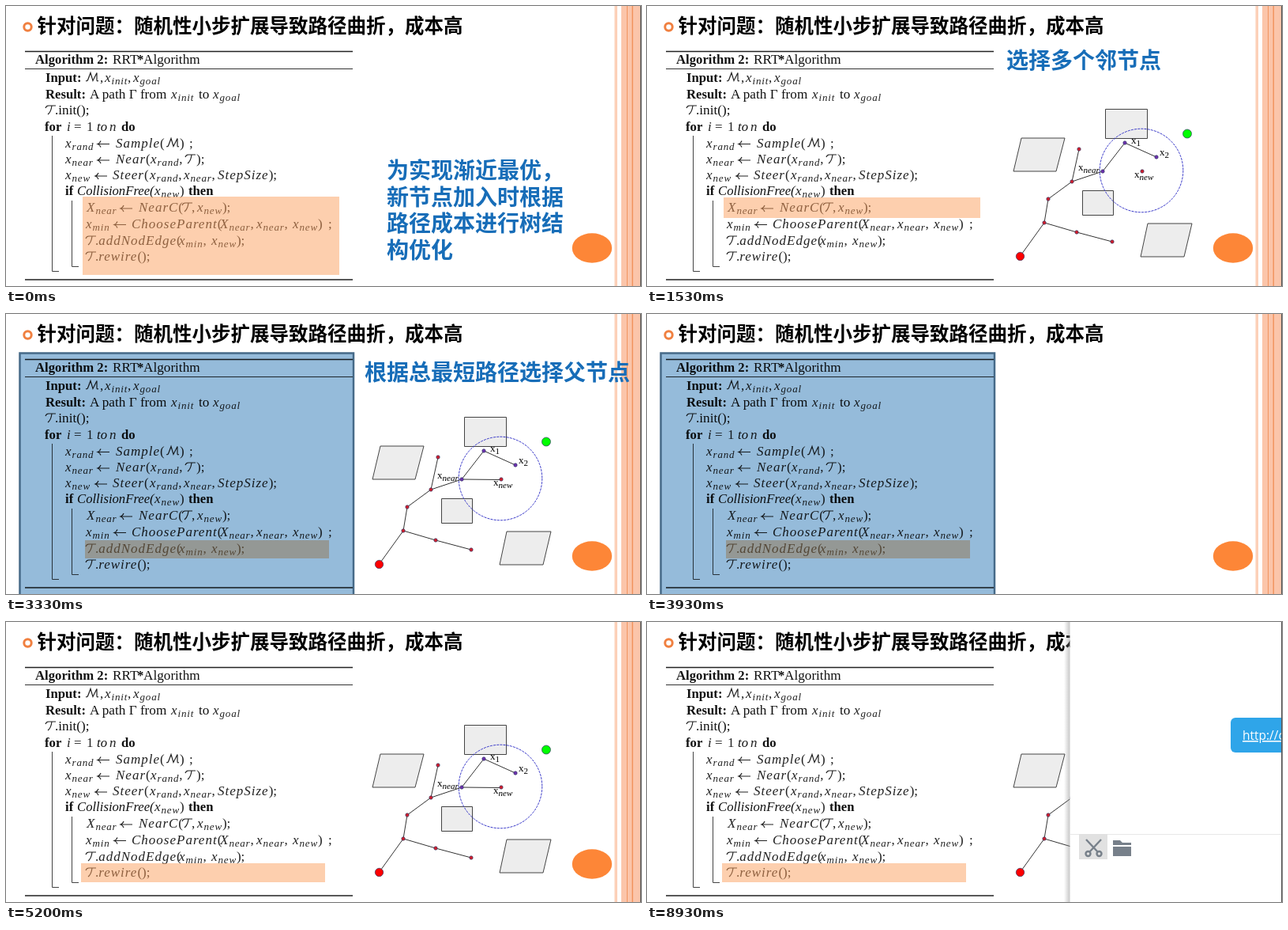
Animation of 804 by 354 pixels, one loop 8990 ms. Source, as an HTML page:

```html
<!DOCTYPE html>
<html lang="zh-CN">
<head>
<meta charset="utf-8">
<style>
html, body { margin: 0; width: 100%; height: 100%; overflow: hidden; background: #fff; }
svg { display: block; width: 804px; height: 354px; }
.cjk { font: bold 28px "Noto Sans CJK SC", "Noto Sans CJK", sans-serif; fill: #176db8; }
.head { font-size: 24.5px; fill: #000; }
.serif { font: 17.2px "Liberation Serif", serif; fill: #111; }
.bold { font-weight: bold; font-size: 16.7px; }
.ital { font-style: italic; font-size: 16.7px; }
.math { font: italic 17px "Liberation Serif", serif; letter-spacing: 1px; fill: #222; }
.math .up { font-style: normal; letter-spacing: 0; }
.math .sub { font-size: 13px; letter-spacing: .8px; }
.label { font: 13px "Liberation Serif", serif; }
.label .sub { font: italic 11px "Liberation Serif", serif; }
.label .num { font-style: normal; }
.script { fill: none; stroke: #222; stroke-width: 1.2; }
.hl { fill: #fc9f5f; fill-opacity: .5; }
.tint { fill: #95bbda; stroke: #466a88; stroke-width: 2.5; mix-blend-mode: multiply; }
.wall { fill: #ededed; stroke: #444; }
.edge { fill: none; stroke: #333; }
.trial { fill: none; stroke: #3aa860; stroke-dasharray: 6 3 1 3; }
</style>
</head>
<body>
<svg id="stage" viewBox="0 0 804 354"></svg>
<script>
// Scene letter and start time in ms
const scenes = [["A", 0], ["B", 1530], ["C", 2330], ["D", 3330], ["E", 3870],
  ["F", 4270], ["G", 5200], ["H", 6470], ["I", 8930]];
const LOOP = 8990;

const on = (letters, body) => `<g data-on="${letters}">${body}</g>`;
const text = (x, y, s, cls) => `<text x="${x}" y="${y}" class="${cls}">${s}</text>`;
const rect = (x, y, w, h, attr) => `<rect x="${x}" y="${y}" width="${w}" height="${h}" ${attr}/>`;
const path = (d, attr) => `<path d="${d}" ${attr}/>`;
const lines = (x, y, step, rows) => rows.map((s, i) => text(x, y + i * step, s, "cjk")).join("");

// "x_new," gives x with subscript "new", then an upright comma
const upright = s => s.replace(/[^A-Za-z\s]+/g, '<tspan class="up">$&</tspan>');
function math(x, y, s) {
  if (s === "←") return path(`M${x + 16} ${y - 4}h-15m4-4q-1 3-4 4q3 1 4 4`, 'class="script"');
  const [, base, sub, rest] = s.match(/^([^_]*)_?([a-z]*)(.*)$/);
  return text(x, y, upright(base) + (sub ? `<tspan class="sub" dy="3">${sub}</tspan>` : "") +
    (rest ? `<tspan dy="-3">${upright(rest)}</tspan>` : ""), "math");
}
const row = (y, ...parts) => parts.map(([x, s]) => math(x, y, s)).join("");
const scriptT = (x, y) => path(`M${x} ${y - 8}q1-3 4-3h9M${x + 8} ${y - 11}q-1 8-5 11`, 'class="script"');
const scriptM = (x, y) => path(`M${x} ${y - 1}q2 1 3-2l3-8 3 10 5-10 0 9q0 2 2 1`, 'class="script"');
const label = (x, y, sub, cls = "") => text(x, y, `x<tspan class="sub ${cls}" dy="3">${sub}</tspan>`, "label");
const dot = (x, y, r, fill) => `<circle cx="${x}" cy="${y}" r="${r}" fill="${fill}" stroke="#333a66" stroke-width=".7"/>`;

const slide =
  '<circle cx="27.5" cy="26.5" r="4.7" fill="none" stroke="#f08040" stroke-width="3"/>' +
  text(39.5, 33.7, "针对问题：随机性小步扩展导致路径曲折，成本高", "cjk head") +
  rect(770.5, 0, 3.5, 354, 'fill="#fcd0b8"') +
  rect(779, 0, 24, 354, 'fill="#fbc5aa"') +
  rect(786, 0, 1, 354, 'fill="#f29560"') +
  rect(792.5, 0, 1.5, 354, 'fill="#f29560"') +
  rect(803, 0, 1, 354, 'fill="#555"') +
  '<ellipse cx="742" cy="306" rx="25.2" ry="18.8" fill="#fd8637"/>';

const algorithm =
  path("M24 57.5H439M24 346H439", 'stroke="#222" stroke-width="1.6"') +
  path("M24 79.5H439", 'stroke="#333"') +
  path("M58.5 164V335.5H67M83.5 246V329.5H92", 'fill="none" stroke="#444"') +
  text(37, 73, "Algorithm 2:", "serif bold") + text(135, 73, "RRT", "serif") +
  text(166, 73, "*", "serif bold") + text(174, 73, "Algorithm", "serif") +
  text(50, 95.5, "Input:", "serif bold") + scriptM(101, 95.5) +
  row(95.5, [119, ","], [125, "x_init,"], [161, "x_goal"]) +
  text(50, 116.5, "Result:", "serif bold") + text(106, 116.5, "A path Γ from", "serif") +
  row(116.5, [209, "x_init"], [262, "x_goal"]) + text(244, 116.5, "to", "serif") +
  scriptT(50, 137) + text(62, 137, ".init();", "serif") +
  text(49, 157.5, "for", "serif bold") + row(157.5, [77, "i"], [86, "="], [102, "1"], [131, "n"]) +
  text(115, 157.5, "to", "serif ital") + text(146, 157.5, "do", "serif bold") +
  row(178.5, [75, "x_rand"], [115, "←"], [139, "Sample("], [220, ")"], [232, ";"]) + scriptM(203, 178.5) +
  row(199, [75, "x_near"], [115, "←"], [139, "Near("], [183, "x_rand,"], [241, ");"]) + scriptT(227, 199) +
  row(219, [75, "x_new"], [112, "←"], [135, "Steer("], [182, "x_rand,"], [225, "x_near,"], [268, "StepSize);"]) +
  text(75, 239, "if", "serif bold") + text(90, 239, "CollisionFree(", "serif ital") +
  row(239, [188, "x_new)"]) + text(231, 239, "then", "serif bold") +
  row(260, [102, "X_near"], [144, "←"], [168, "NearC("], [235, ","], [242, "x_new);"]) + scriptT(223, 260) +
  row(280.5, [101, "x_min"], [136, "←"], [159, "ChooseParent("], [271, "X_near,"], [317, "x_near,"], [363, "x_new)"], [408, ";"]) +
  scriptT(101, 302) + row(302, [113, ".addNodEdge("], [219, "x_min,"], [260, "x_new);"]) +
  scriptT(101, 322) + row(322, [113, ".rewire();"]);

const highlight = (letters, x, y, w, h) => on(letters, rect(x, y, w, h, 'class="hl"'));
const highlights =
  highlight("A", 97, 241, 325, 99) +
  highlight("B", 97, 242, 325, 26) +
  highlight("C", 99, 264, 325, 26) +
  highlight("DE", 100, 286, 309, 23) +
  highlight("FGHI", 95, 305, 309, 24) +
  on("DE", rect(17.5, 49.5, 422.5, 320, 'class="tint"'));

const notes =
  on("A", lines(482, 218, 33.6, ["为实现渐近最优，", "新节点加入时根据", "路径成本进行树结", "构优化"])) +
  on("B", lines(455, 79, 33.6, ["选择多个邻节点"])) +
  on("C", lines(455, 79, 33.6, ["评估各邻节点作为父节点下", "的总路径长度"])) +
  on("D", lines(454, 83.5, 33.6, ["根据总最短路径选择父节点"])) +
  on("F", lines(454, 83.5, 33.6, ["优化邻节点路径，如果从新", "节点到该节点形成的路径优", "于现有树中路径，则将该节", "点父节点修改为新节点"]));

const red = [[503, 274], [508, 244], [538, 222], [547, 181], [627, 209], [544, 286], [589, 298]];
const purple = [[577, 209], [605, 173], [645, 191]];
const tree = on("BCDGHI",
  path("M474 167H529L518 209H464ZM580.5 130.5H633.5V167.5H580.5ZM551.5 233.5H590.5V264.5H551.5ZM634 275H690L680 317H625Z", 'class="wall"') +
  '<circle cx="626" cy="208" r="52.8" fill="none" stroke="#3434c8" stroke-dasharray="3 1.2"/>' +
  path("M472 317L503 274 508 244 538 222 547 181M538 222L577 209 605 173M503 274L544 286 589 298", 'class="edge"') +
  on("BCDG", path("M605 173L645 191", 'class="edge"')) +
  on("C", path("M627 209L605 173M627 209H577M627 209L645 191", 'class="trial"')) +
  on("DGHI", path("M577 209L627 209.5", 'class="edge"')) +
  on("HI", path("M627 209L645 191", 'class="edge"')) +
  red.map(([x, y]) => dot(x, y, 2.2, "#d81c28")).join("") +
  purple.map(([x, y]) => dot(x, y, 2.2, "#7030b0")).join("") +
  dot(472.5, 316.5, 5.2, "#f00") + dot(684, 161.5, 5.5, "#0f0") +
  label(546, 207.5, "near") + label(617, 216.5, "new") + label(613, 173.5, "1", "num") + label(649, 188.5, "2", "num"));

const chat = on("I",
  '<defs><linearGradient id="shade"><stop stop-color="#888" stop-opacity="0"/><stop offset="1" stop-color="#888" stop-opacity=".5"/></linearGradient></defs>' +
  rect(528, 0, 8, 354, 'fill="url(#shade)"') +
  rect(535.5, 0, 269, 354, 'fill="#fff"') +
  path("M536 268.5H804", 'stroke="#e8e8e8"') +
  rect(739, 121, 80, 44, 'rx="6" fill="#2fa5e9"') +
  '<text x="754" y="149" font-family="Open Sans, sans-serif" font-size="15.5" fill="#fff" text-decoration="underline">http://c</text>' +
  rect(547, 268, 36, 32, 'fill="#e1e1e1"') +
  '<g fill="none" stroke="#77808a" stroke-width="2.4"><path d="M556 275L571 291M575 275L560 291"/><circle cx="558.5" cy="293" r="3"/><circle cx="572.5" cy="293" r="3"/></g>' +
  path("M590 276H599L602 279H613V282H590ZM590 284H613V296H590Z", 'fill="#77808a"') +
  rect(803, 0, 1, 354, 'fill="#555"'));

const stage = document.getElementById("stage");
stage.innerHTML = slide + algorithm + highlights + notes + tree + chat;
const groups = [...stage.querySelectorAll("[data-on]")];

function draw() {
  const t = performance.now() % LOOP;
  const scene = scenes.filter(s => s[1] <= t).pop()[0];
  for (const g of groups) g.style.display = g.dataset.on.includes(scene) ? "" : "none";
  requestAnimationFrame(draw);
}
draw();
</script>
</body>
</html>
```
